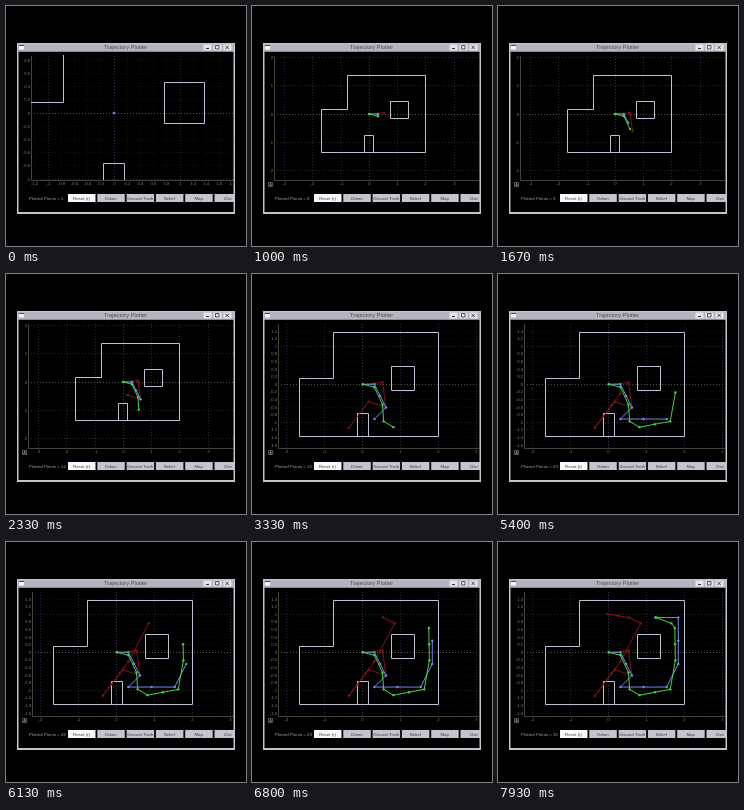
Recreate the animation shown at these times as an HTML page with a canvas. Size 240 by 240 pixels, loop 8 s.

```html
<!DOCTYPE html>
<html lang="en">
<head>
<meta charset="utf-8">
<title>Trajectory Plotter</title>
<style>
  html, body { margin: 0; width: 100%; height: 100%; overflow: hidden; background: #000; }
  canvas { display: block; width: 240px; height: 240px; }
</style>
</head>
<body>
<canvas width="240" height="240"></canvas>
<script>
const ctx = document.querySelector('canvas').getContext('2d');
const LOOP = 8000;
const POSE_INTERVAL = 690;
const TILE = 0.3048; // metres
const PLOT = { top: 50, right: 227, bottom: 174 };

// Zoom levels, each used from a given pose on; scale is in pixels per metre.
const views = [
  { fromPose: 1, x: 108, y: 107, scale: 66, left: 25, stepX: 0.2, stepY: 0.2 },
  { fromPose: 2, x: 117.3, y: 108, scale: 28.3, left: 22, stepX: 1, stepY: 1 },
  { fromPose: 5, x: 110.8, y: 110.3, scale: 38, left: 26, stepX: 1, stepY: 0.2 }
];

// All shapes and tracks are measured in floor tiles.
const rectangle = (x, y, w, h) => [[x, y], [x + w, y], [x + w, y + h], [x, y + h], [x, y]];
const shapes = [
  [[-5.5, -4.5], [6.5, -4.5], [6.5, 4.5], [-2.5, 4.5], [-2.5, 0.5], [-5.5, 0.5], [-5.5, -4.5]],
  rectangle(-0.5, -4.5, 1, 2),
  rectangle(2.5, -0.5, 2, 2)
];

// Every key is [x, y, poses]: a straight run ending at x, y, split into equal poses.
function track(color, ...keys) {
  const points = [[0, 0]];
  for (const [x, y, poses = 1] of keys) {
    const [x0, y0] = points[points.length - 1];
    for (let i = 1; i <= poses; i++) {
      points.push([x0 + (x - x0) * i / poses, y0 + (y - y0) * i / poses]);
    }
  }
  return { color, points };
}

const odometry = track('#84141a', [1.7, 0.15], [2, -2], [0.5, -1.5], [-1.2, -3.75],
  [1, -0.8, 3], [2.75, 2.5], [1.75, 3], [-0.1, 3.3, 2]);
const belief = track('#7486e8', [1, 0], [2, -2, 2], [1, -3], [5, -3, 2], [6, -1], [6, 3, 2], [4, 3]);
const truth = track('#3fd646', [1, -0.25], [1.7, -1.75], [1.8, -3.2], [2.65, -3.7],
  [5.3, -3.2, 2], [5.75, -0.7], [5.7, 2.1, 2], [5.4, 2.5], [4.1, 3]);

const snap = v => Math.floor(v) + 0.5;

function text(label, x, y, color, size, align = 'center') {
  ctx.font = `${size}px "Liberation Sans", Arial, sans-serif`;
  ctx.textAlign = align;
  ctx.fillStyle = color;
  ctx.fillText(label, x, y);
}

function line(points, color, width = 1, dash = []) {
  ctx.beginPath();
  points.forEach(([x, y]) => ctx.lineTo(x, y));
  ctx.strokeStyle = color;
  ctx.lineWidth = width;
  ctx.setLineDash(dash);
  ctx.stroke();
}

function box(x, y, w, h, fill) {
  ctx.fillStyle = fill;
  ctx.fillRect(x, y, w, h);
}

function drawWindow(pointCount) {
  box(0, 0, 240, 240, '#000');
  box(11, 37, 218, 171, '#c4c4cc');
  box(12.5, 45.5, 215, 160.5, '#000');
  box(12, 38, 216, 7.5, '#b4b4c0');
  box(13, 39, 5, 4.5, '#f4f4fa');
  box(13, 39, 5, 1, '#444474');
  text('Trajectory Plotter', 119.5, 43.4, '#4c4c54', 5.7);
  for (let i = 0; i < 3; i++) box(197.5 + i * 10, 38.5, 8, 6, '#e4e4ea');
  line([[200, 42.5], [203, 42.5]], '#333');
  line(rectangle(209.5, 39.5, 3.5, 3.5), '#333', 0.8);
  line([[219.5, 39.8], [222.8, 43.1]], '#333', 0.9);
  line([[222.8, 39.8], [219.5, 43.1]], '#333', 0.9);

  text(`Plotted Points = ${pointCount}`, 23, 194, '#a4a4ac', 4.4, 'left');
  ['Reset (r)', 'Odom', 'Ground Truth', 'Belief', 'Map', 'Dist'].forEach((label, i) => {
    const x = 62 + i * 29.3;
    box(x, 188, Math.min(27.5, 228 - x), 8, i ? '#c4c4cc' : '#f8f8fc');
    text(label, x + 13.5, 193.6, '#3c3c48', 4.4);
  });
}

function gridLine(a, b, zeroColor, color, index, step) {
  const dim = step < 1 && index % 5;
  ctx.globalAlpha = dim ? 0.4 : 1;
  line([a, b], index === 0 ? zeroColor : color, 1, [1, 2]);
  ctx.globalAlpha = 1;
}

function drawGrid({ x, y, scale, left, stepX, stepY }) {
  const label = (i, step) => String(+(i * step).toFixed(1));
  const { top, right, bottom } = PLOT;
  const gapX = stepX * scale;
  const gapY = stepY * scale;
  for (let i = Math.ceil((left - x) / gapX); x + i * gapX <= right; i++) {
    const px = snap(x + i * gapX);
    gridLine([px, top], [px, bottom], '#34345c', '#242440', i, stepX);
    text(label(i, stepX), px, 179, '#84847c', 4.2);
  }
  for (let j = Math.ceil((y - bottom) / gapY); y - j * gapY >= top; j++) {
    const py = snap(y - j * gapY);
    gridLine([left, py], [right, py], '#54543a', '#2c2c20', j, stepY);
    text(label(j, stepY), left - 1, py + 1.4, '#84847c', 4.2, 'right');
  }
  line([[left + 0.5, top], [left + 0.5, bottom + 0.5], [right, bottom + 0.5]], '#44443a');
}

function drawPlot(view, visible) {
  const toPixels = ([x, y]) =>
    [view.x + x * TILE * view.scale, view.y - y * TILE * view.scale];
  ctx.save();
  ctx.beginPath();
  ctx.rect(view.left, PLOT.top - 1, PLOT.right - view.left, PLOT.bottom - PLOT.top + 1);
  ctx.clip();
  for (const shape of shapes) {
    line(shape.map(p => toPixels(p).map(snap)), '#c0c0d4');
  }
  for (const [{ color, points }, count] of visible) {
    const path = points.slice(0, count).map(toPixels);
    line(path, color);
    for (const [x, y] of path) {
      ctx.beginPath();
      ctx.arc(x, y, 1.2, 0, Math.PI * 2);
      ctx.fillStyle = color;
      ctx.fill();
    }
  }
  ctx.restore();
}

function draw(time) {
  const poses = 1 + Math.floor(time % LOOP / POSE_INTERVAL);
  const view = views.filter(v => v.fromPose <= poses).pop();
  // Belief updates gradually fall behind the other two tracks.
  const beliefs = Math.round(poses * 0.92);
  const zoomed = view !== views[0];

  drawWindow(zoomed ? 2 * poses + beliefs : 1);
  drawGrid(view);
  drawPlot(view, [[odometry, poses], [belief, beliefs], [truth, zoomed ? poses : 0]]);
  if (zoomed) {
    line(rectangle(16.5, 176.5, 4, 4), '#77777f', 0.7);
    text('A', 18.5, 180, '#b4b4bc', 4);
  }
}

const start = performance.now();
function tick() {
  draw(performance.now() - start);
  requestAnimationFrame(tick);
}
tick();
</script>
</body>
</html>
```
